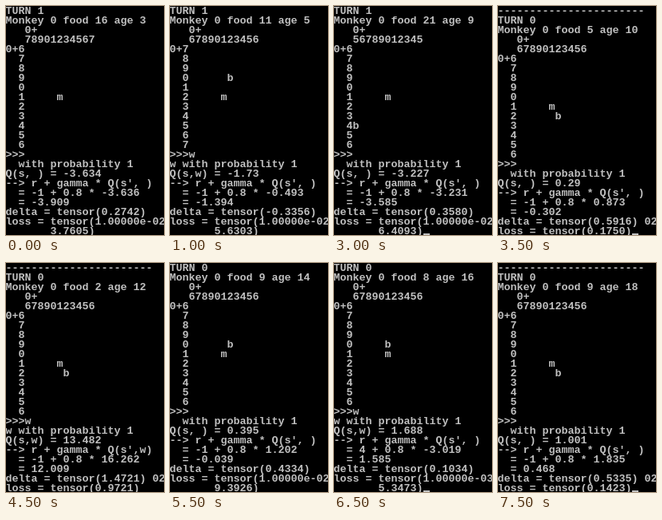
An HTML page for the animation above (8000 ms loop, 198 by 287 pixels).

```html
<!DOCTYPE html>
<html lang="en">
<head>
<meta charset="utf-8">
<title>Monkey Q-learning log</title>
<style>
  html, body { margin: 0; width: 100%; height: 100%; overflow: hidden; background: #000; }
  svg { display: block; }
  text {
    font: bold 13.333px "Liberation Mono", "DejaVu Sans Mono", monospace;
    white-space: pre;
    fill: #c0c0c0;
  }
  rect { fill: #c0c0c0; }
</style>
</head>
<body>
<svg id="term" width="198" height="287" viewBox="0 0 198 287"></svg>
<script>
const STEP = 500, TURNS = 16, ROWS = 24, CW = 8, CH = 12;
const VIEW = 11, MID = 5, GAMMA = 0.8;
const BLINK = "....#.###...####";

// Each episode lasts two turns; q holds the values of the three states it passes.
const episodes = [
  { food: 17, q: [-3.2, -3.634395, -3.6358], x: 7, banana: null },
  { food: 12, q: [-1.771, -1.729968, -0.493], acts: " w", y: 7, banana: [1, -2] },
  { food: 14, q: [-0.972, 0.412, 1.4565], acts: " w" },
  { food: 22, q: [-3.871, -3.226769, -3.231], acts: "w ", x: 5, y: 7, banana: [-5, 2] },
  { food: 5, q: [0.29, 0.873, 1.526], banana: [1, 1] },
  { food: 2, q: [13.48154, 16.2618, 22.714], acts: "ww", banana: [1, 1] },
  { food: 9, q: [0.394699, 1.2016, 1.975] },
  { food: 8, q: [1.688215, -3.019, -2.924], acts: "w ", banana: [0, -1] },
  { food: 9, q: [1.00126, 1.8347, 2.1], banana: [1, 1] }
];

const round3 = n => String(+n.toFixed(3));
const digit = n => String(n % 10);

// "w" walks one cell up; reaching the banana earns 5, every turn costs 1.
function play({ food, q, acts = "  ", x = 6, y = 6, banana = [1, -1] }, turn) {
  let reward;
  for (let t = 0; t <= turn; t++) {
    if (t > 0) {
      food += reward;
      if (acts[t - 1] === "w") {
        y--;
        banana = reward > 0 ? null : banana && [banana[0], banana[1] + 1];
      }
    }
    const eats = acts[t] === "w" && banana && banana[0] === 0 && banana[1] === -1;
    reward = eats ? 4 : -1;
  }
  return { food, x, y, banana, reward, act: acts[turn], next: acts[turn + 1] || " ",
           value: q[turn], nextQ: q[turn + 1] };
}

function grid({ x, y, banana }) {
  const cells = Array.from({ length: VIEW }, () => Array(VIEW).fill(" "));
  if (banana) cells[MID + banana[1]][MID + banana[0]] = "b";
  cells[MID][MID] = "m";
  const head = cells.map((_, i) => digit(x + i)).join("");
  const body = cells.map((row, i) => (i ? "  " : "0+") + digit(y + i) + row.join(""));
  return ["   0+", "   " + head, ...body];
}

function screen(k) {
  const turn = (k + 1) % 2;
  const s = play(episodes[(k + 1) >> 1], turn);
  const goal = s.reward + GAMMA * s.nextQ;
  const delta = s.value - goal, size = Math.abs(delta);
  const loss = size < 1 ? size * size / 2 : size - 0.5;
  const deltaLine = `delta = tensor(${delta.toFixed(4)})`;

  const lines = [
    `TURN ${turn}`,
    `Monkey 0 food ${s.food} age ${k + 3}`,
    ...grid(s),
    `>>>${s.act}`,
    `${s.act} with probability 1`,
    `Q(s,${s.act}) = ${round3(s.value)}`,
    `--> r + gamma * Q(s',${s.next})`,
    `  = ${s.reward} + ${GAMMA} * ${round3(s.nextQ)}`,
    `  = ${round3(goal)}`
  ];
  if (loss < 0.1) {
    const exp = Math.floor(Math.log10(loss));
    return [...lines, deltaLine, `loss = tensor(1.00000e-0${-exp}`,
      `       ${(loss / 10 ** exp).toFixed(4)})`];
  }
  // "02" is the end of the previous, longer line
  return ["-".repeat(23), ...lines, deltaLine.padEnd(23) + "02",
    `loss = tensor(${loss.toFixed(4)})`];
}

const term = document.getElementById("term");
function add(tag, attrs) {
  const el = document.createElementNS("http://www.w3.org/2000/svg", tag);
  for (const name in attrs) el.setAttribute(name, attrs[name]);
  return term.appendChild(el);
}
const rows = Array.from({ length: ROWS }, (_, i) => add("text", { x: -0.5, y: i * CH + 10 }));
const caret = add("rect", { y: 285, width: CW, height: 2 });

let shown = -1;
function loop() {
  const k = Math.floor(performance.now() / STEP) % TURNS;
  if (k !== shown) {
    shown = k;
    const lines = screen(k);
    rows.forEach((row, i) => { row.textContent = lines[i]; });
    caret.setAttribute("x", lines[ROWS - 1].length * CW);
    caret.setAttribute("visibility", BLINK[k] === "#" ? "visible" : "hidden");
  }
  requestAnimationFrame(loop);
}
loop();
</script>
</body>
</html>
```
